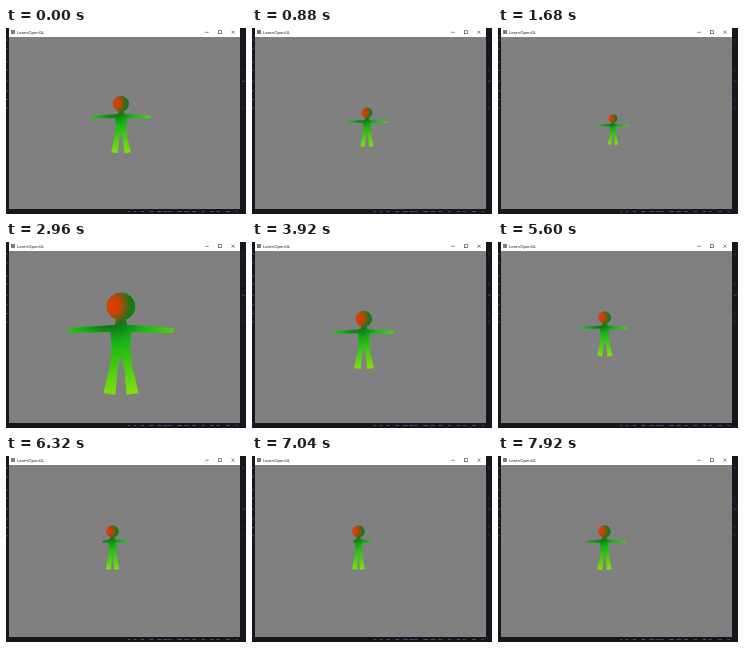
Animation, 240 px wide and 186 px high, one loop 8 s. Source, as an HTML page:

```html
<!DOCTYPE html>
<html lang="en">
<head>
<meta charset="utf-8">
<title>LearnOpenGL</title>
<style>
  html, body { margin: 0; width: 100%; height: 100%; overflow: hidden; background: #17161d; }
  svg { display: block; width: 100%; height: 100%; }
  text { font-family: "Open Sans", "Noto Sans", sans-serif; }
</style>
</head>
<body>
<svg viewBox="0 0 240 186" preserveAspectRatio="none">
  <defs>
    <radialGradient id="shade" gradientUnits="userSpaceOnUse" cx="-10" cy="-38" r="95">
      <stop offset="0" stop-color="#e63c08"/>
      <stop offset=".1" stop-color="#c04408"/>
      <stop offset=".22" stop-color="#107818"/>
      <stop offset=".4" stop-color="#18b414"/>
      <stop offset=".7" stop-color="#50d010"/>
      <stop offset="1" stop-color="#8ce010"/>
    </radialGradient>
  </defs>

  <!-- editor behind the window -->
  <rect width="240" height="186" fill="#17161d"/>
  <g id="editor" fill="none"></g>

  <!-- window -->
  <rect x="3" width="231" height="181" fill="#808080"/>
  <rect x="3" width="231" height="9" fill="#fff"/>
  <rect x="5" y="2" width="4" height="4" fill="#777f86"/>
  <text x="11" y="6" font-size="4.2" fill="#111">LearnOpenGL</text>
  <g fill="none" stroke="#333" stroke-width=".6">
    <path d="M199.3 4.3h3.4M225.5 2.7l3 3m0-3l-3 3"/>
    <rect x="212.5" y="2.7" width="3" height="3"/>
  </g>

  <path id="figure" fill="url(#shade)" stroke="url(#shade)" stroke-linejoin="round"/>
</svg>
<script>
const LOOP = 8000, STEP = 80;
const $ = id => document.getElementById(id);
const clamp = p => Math.min(1, Math.max(0, p));
const ramp = (t, from, to) => clamp((t - from) / (to - from));
const lerp = (a, b, p) => a + (b - a) * p;

// Apparent size is the inverse of the camera distance, which moves evenly.
const zoom = (a, b, p) => 1 / lerp(1 / a, 1 / b, p);

// The screen refreshes on a fixed step and skips one step in six.
function stepTime(ms) {
  const t = Math.floor((ms % LOOP) / STEP) * STEP;
  return t % 480 === 320 ? t - STEP : t;
}

function sizeAt(t) {
  if (t < 2320) return zoom(57, 28, ramp(t, 0, 2000));
  if (t < 2960) return zoom(28, 102, ramp(t, 2320, 2960));
  if (t < 3920) return zoom(102, 58, ramp(t, 2960, 3920));
  return zoom(58, 44.5, ramp(t, 3920, 5600));
}

function poseAt(t) {
  const drift = ramp(t, 2960, 5600);
  const turn = 130 * ramp(t, 5600, 7040) + 30 * ramp(t, 7040, LOOP) - 10 * ramp(t, 3920, 5600);
  return {
    x: lerp(115, 106.5, drift),
    y: 96.5 + 5 * ramp(t, 0, 1680) - 10 * drift,
    scale: sizeAt(t) / 102,
    yaw: turn * Math.PI / 180
  };
}

// Tapered bar from (x1, y1) to (x2, y2) with half widths w1 and w2.
function limb(x1, y1, w1, x2, y2, w2) {
  const len = Math.hypot(x2 - x1, y2 - y1) || 1;
  const nx = (y1 - y2) / len, ny = (x2 - x1) / len;
  return `M${x1 + nx * w1} ${y1 + ny * w1}L${x2 + nx * w2} ${y2 + ny * w2}` +
    `L${x2 - nx * w2} ${y2 - ny * w2}L${x1 - nx * w1} ${y1 - ny * w1}Z`;
}

function outline(yaw) {
  const spread = Math.abs(Math.cos(yaw));
  const near = 9 * Math.sin(yaw);
  const w = 0.6 + 0.4 * spread;
  let d = "M0 -50.5A14 13.5 0 0 0 0 -23.5A14 13.5 0 0 0 0 -50.5Z" +
    limb(0, -25, 4, 0, -17, 6 * w) +
    limb(0, -18, 10.5 * w, 0, 10, 8.5 * w);
  for (const s of [-1, 1]) {
    const reach = s * 52 * spread + near;
    d += limb(s * 8 * w, -15, 3, reach, -13, 2) +
      limb(s * 4.5 * w, 8, 4.5, s * 8 * w, 29, 3.5) +
      limb(s * 8 * w, 28, 4, s * 11.5 * w, 50, 5.5);
  }
  return d;
}

function draw(ms) {
  const { x, y, scale, yaw } = poseAt(stepTime(ms));
  $("figure").setAttribute("d", outline(yaw));
  $("figure").setAttribute("transform", `translate(${x} ${y}) scale(${scale})`);
}

// Scraps of code showing around the window.
function drawEditor() {
  let seed = 7;
  const rnd = () => (seed = seed * 16807 % 2147483647) / 2147483647;
  const dash = (x, y, w, hue) =>
    `<path d="M${x} ${y}h${w}" stroke="hsl(${hue} 25% 40%)" stroke-width=".8"/>`;
  let marks = "";
  for (let x = 122; x < 234; x += 4 + rnd() * 6) marks += dash(x, 183.5, 2 + rnd() * 3, 180 + rnd() * 150);
  for (let y = 12; y < 80; y += 5 + rnd() * 9) marks += dash(0, y, 2, 220) + dash(236, y, rnd() * 3, 240);
  $("editor").innerHTML = marks;
}

drawEditor();
const start = performance.now();
function tick() {
  draw(performance.now() - start);
  requestAnimationFrame(tick);
}
tick();
</script>
</body>
</html>
```
